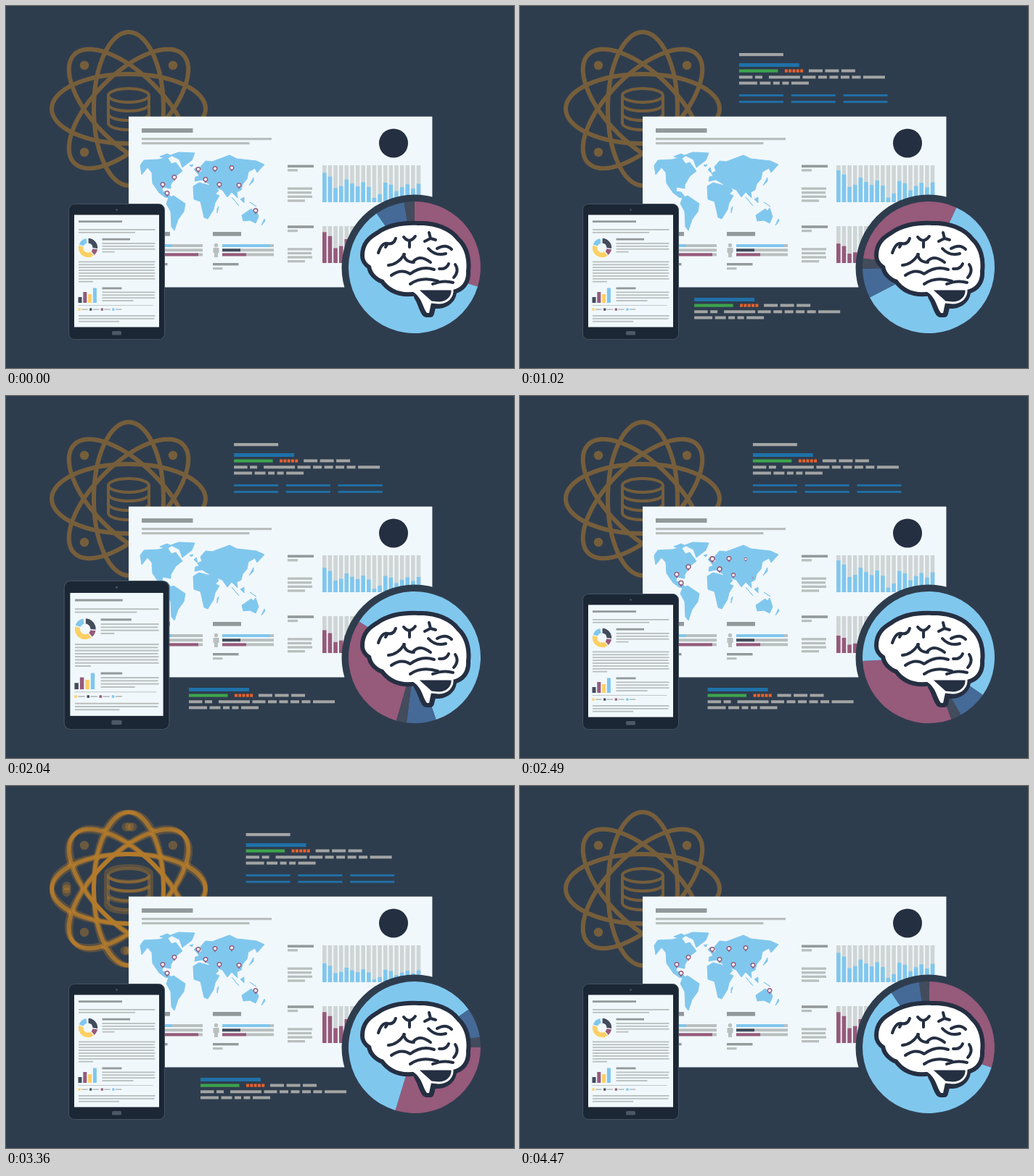
These frames come from a looping animation (700x500 px, 4500 ms). An HTML page:

```html
<!DOCTYPE html>
<html>
<head>
<meta charset="utf-8">
<style>
  html, body { margin: 0; height: 100%; overflow: hidden; background: #2e3d4e; }
  svg { display: block; width: 700px; height: 500px; }
</style>
</head>
<body>
<svg viewBox="0 0 700 500">
  <defs>
    <g id="orbits">
      <g fill="none" stroke-width="6">
        <ellipse id="orbit" rx="106" ry="48"/>
        <use href="#orbit" transform="rotate(45)"/>
        <use href="#orbit" transform="rotate(90)"/>
        <use href="#orbit" transform="rotate(135)"/>
      </g>
      <g stroke="none">
        <circle cx="-61" cy="-60" r="6.2"/><circle cx="61" cy="-60" r="6.2"/><circle cx="-61" cy="60" r="6.2"/>
      </g>
    </g>
    <g id="database" fill="none" stroke-width="4">
      <ellipse cy="-18.5" rx="28" ry="9.5"/>
      <path d="M-28-18V20C-26 32 26 32 28 20V-18M-28-6C-26 6 26 6 28-6M-28 7C-26 19 26 19 28 7"/>
    </g>
  </defs>

  <g transform="translate(169 142)" fill="#f59a1c" stroke="#f59a1c">
    <g id="atom"><use href="#orbits"/><use href="#database"/></g>
    <g id="echoes"></g>
  </g>
  <g id="codeTop"></g>
  <g id="codeBottom"></g>

  <rect x="169" y="152.7" width="418.400" height="235.800" fill="#f1f8fb"/>
  <g id="panel"></g>
  <g fill="#80c7ee" stroke="#80c7ee" stroke-linejoin="round">
    <path d="M185 220L190 213 210 212 222 209 228 218 234 216 243 228 234 235 227 247 227 252 216 250 215 256 222 257 229 266 219 264 211 258 202 245 201 230 195 223 187 233Z"/>
    <path d="M212 208L222 204 228 207 222 211ZM227 206L238 202 260 203 256 213 243 223 239 212Z"/>
    <path d="M224 265L231 262 247 273 245 284 237 295 232 310 228 305 227 284 221 273Z"/>
    <path d="M258 249L266 244 285 249 289 260 294 262 288 272 286 281 278 294 273 292 268 270 259 267ZM291 280L293 277 291 286Z"/>
    <path d="M260 242L261 236 266 235 264 231 270 228 268 222 275 214 284 215 308 206 318 211 345 214 356 219 346 230 343 224 334 229 332 239 326 246 324 254 318 257 319 265 311 257 305 264 298 254 290 251 293 255 287 261 280 246 270 240Z"/>
    <path d="M259 226L262 223 264 231ZM253 220L258 219 256 222ZM341 237L341 242 335 248ZM311 264L321 276ZM323 267L328 264 328 272ZM336 271L345 277Z"/>
    <path d="M325 289L338 280 341 283 344 279 348 291 344 300 336 296 327 297ZM356 294L357 297 352 303Z"/>
  </g>
  <g id="charts"></g>
  <g id="pins"></g>
  <g fill="#b9bfbe"><circle cx="289.500" cy="330.500" r="2.700"/><path d="M285.500 334H293.500V341H292V347H287V341H285.500Z"/></g>
  <circle cx="534" cy="189.500" r="20" fill="#252f42"/>

  <g id="tablet">
    <rect x="86.500" y="273.500" width="132" height="187" rx="8" fill="#1c2735" stroke="#465161"/>
    <rect x="94" y="288.500" width="117" height="155" fill="#f1f8fb"/>
    <circle cx="152.500" cy="281.500" r="1.300" fill="#4d5866"/>
    <rect x="146" y="449" width="13" height="5.500" rx="1.500" fill="#4d5866"/>
    <g id="page"></g>
    <g id="donut" transform="translate(113 334)" stroke="#f1f8fb" stroke-width="1.200"></g>
  </g>

  <circle cx="563" cy="361" r="100.500" fill="#2e3d4e"/>
  <g transform="translate(563 361)"><g id="pie"></g></g>

  <g stroke-linejoin="round" stroke-linecap="round">
    <g fill="#252f42" stroke="#252f42" stroke-width="12">
      <path id="lobe" d="M494 345C494 329 503 322 513 316C528 305 549 302 568 303C592 302 612 311 621 324C632 334 636 350 634 366C635 380 628 390 615 392L566 394C545 398 530 392 520 378C511 375 504 368 503 359C497 355 494 351 494 345Z"/>
      <path d="M566 392H615C616 402 608 411 596 412L587 412 584 424 579 424C574 418 574 410 568 401Z"/>
    </g>
    <use href="#lobe" fill="#fff"/>
    <path d="M566 391H615C616 402 608 410 596 410L586 409Z" fill="#252f42" stroke="#fff" stroke-width="3"/>
    <path d="M558 393C574 402 573 414 580 424L583 424 586 410 568 391Z" fill="#fff"/>
    <path d="M513 341Q518 326 526 328T537 321M526 328L523 333M548 319Q556 329 564 318M556 325V333M583 313L585 321 577 325M585 321L592 323M582 335Q592 346 606 342M594 335Q606 328 614 336M527 358Q540 357 549 343M548 343Q550 354 562 354M562 352Q571 343 585 354M531 372Q545 362 557 370 573 358 590 364M557 384Q573 373 595 380M597 363Q607 364 610 356M619 357Q625 366 617 375M588 384Q603 378 616 382" fill="none" stroke="#252f42" stroke-width="4"/>
  </g>
</svg>

<script>
const LOOP = 4500;
const DARK = '#939a9b', GREY = '#b9bfbe', TRACK = '#cfd5d5', CODE = '#a3a5a4';
const SKY = '#80c7ee', PLUM = '#965a7b', NAVY = '#434c5c', GOLD = '#fcd064', BLUE = '#1f71a8';
const el = id => document.getElementById(id);
const times = (n, make) => Array.from({ length: n }, (_, i) => make(i)).join('');
const rect = (x, y, w, h, fill) => `<rect x="${x}" y="${y}" width="${w}" height="${h}" fill="${fill}"/>`;
// Lines of greeked text; the last one is shorter.
const paragraph = (x, y, width, count, last, pitch, h) =>
  times(count, i => rect(x, y + i * pitch, i < count - 1 ? width - i % 2 : last, h, GREY));

// One row of code words, laid out from left to right.
function words(x, y, ...widths) {
  return widths.map(w => {
    const word = rect(x, y, w, 4, CODE);
    x += w + 3.5;
    return word;
  }).join('');
}

// Pie slices from [end angle, colour], each starting where the last one ends.
function slices(radius, parts) {
  const point = a => `${radius * Math.sin(a * Math.PI / 180)} ${-radius * Math.cos(a * Math.PI / 180)}`;
  let from = 0;
  return parts.map(([to, fill]) => {
    const path = `<path d="M0 0L${point(from)}A${radius} ${radius} 0 ${+(to - from > 180)} 1 ${point(to)}Z" fill="${fill}"/>`;
    from = to;
    return path;
  }).join('');
}

// Blocks of abstract code
const listing =
  rect(0, 79, 83, 5, BLUE) + rect(0, 87.5, 53.5, 4.2, '#3da44c') +
  times(5, i => rect(63 + i * 5.3, 87.5, 4, 4.2, '#e9622b')) + words(96, 87.5, 19, 19, 19) +
  words(0, 96.3, 18.5, 10) + words(41, 96.3, 43, 18, 12, 12, 12, 12, 30) + words(0, 104.5, 25, 15, 9, 9, 24);
el('codeTop').innerHTML = rect(0, 65, 61, 4.2, CODE) + listing +
  times(6, i => rect(i % 3 * 71.8, i < 3 ? 122 : 131, 61, 2.8, BLUE));
el('codeBottom').innerHTML = listing;

// Dashboard
const legend = y => rect(388, y, 36, 3.6, DARK) + rect(388, y + 5.7, 14, 3.3, GREY) + paragraph(388, y + 31, 34, 4, 24, 5.6, 3.3);
const meters = (x, ...values) =>
  rect(x, 312, 39, 5.7, DARK) + rect(x, 355, 35.5, 3.4, DARK) + rect(x, 361, 13.5, 3.2, GREY) +
  times(3, i => rect(x + 13, 329 + i * 6.2, 71, 4, GREY) + rect(x + 13, 329 + i * 6.2, values[i], 4, [SKY, NAVY, PLUM][i]));
el('panel').innerHTML =
  rect(187, 169, 70.5, 6, DARK) + paragraph(187, 182, 179, 2, 148.5, 6, 3.2) +
  legend(219.5) + legend(303.2) + meters(187, 29, 14, 65) + meters(285, 66, 25, 33);

function chart(id, base, fill) {
  const bar = (i, y, h, color) => rect(436 + i * 7.63, y, 5.6, h, color);
  const height = a => 24 + 6.5 * Math.cos(a - .44) + 5.8 * Math.cos(3 * a) + 7.5 * Math.cos(5 * a - .6);
  return times(18, i => bar(i, base - 51, 51, TRACK)) +
    `<g id="${id}">${times(18, i => bar(i, -height(i * Math.PI / 9), height(i * Math.PI / 9), fill))}</g>`;
}
el('charts').innerHTML = chart('skyBars', 271, SKY) + chart('plumBars', 355, PLUM);

const pins = [[216, 252], [222, 264], [232, 242], [265, 231], [275, 245], [288, 230], [294, 252], [311, 229], [321, 253], [344, 288]];
el('pins').innerHTML = times(pins.length, () =>
  `<g><path d="M0 0C-1-3-3.500-3-3.500-5.500A3.500 3.500 0 0 1 3.500-5.500C3.500-3 1-3 0 0Z" fill="${PLUM}"/><circle cy="-5.500" r="2" fill="#fff"/></g>`);
const pinNodes = [...el('pins').children];

// Tablet page
const text = (...box) => paragraph(...box, 3.9, 1.8);
const palette = [GOLD, NAVY, PLUM, SKY];
el('page').innerHTML =
  rect(100, 296.3, 60, 2.8, DARK) + rect(132.5, 320.8, 38.5, 2.8, DARK) + rect(132.5, 388.5, 27, 2.8, DARK) +
  text(100, 308, 105.5, 2, 78) + text(132.5, 327, 73, 4, 17) + text(100, 352.5, 105.5, 8, 20) +
  text(132.5, 394.5, 73, 4, 43) + text(100, 427, 105.5, 3, 56) + rect(99.5, 413, 103, .8, GREY) +
  [8, 15, 12, 20.5].map((h, i) => rect(99.5 + i * 6.8, 410 - h, 5, h, [NAVY, PLUM, GOLD, SKY][i])).join('') +
  times(4, i => rect(99.5 + i * 15.6, 417.5, 3.2, 3.2, palette[i]) + rect(104 + i * 15.6, 418.3, 8.5, 1.6, GREY));
el('donut').innerHTML =
  slices(13.8, [[97, NAVY], [142, PLUM], [288, GOLD], [352, SKY]]) + '<circle r="6" fill="#f1f8fb"/>';
el('pie').innerHTML = slices(91, [[107, PLUM], [325, SKY], [351, '#456a97'], [360, NAVY]]);

// Motion
const progress = (t, start, length) => Math.min(1, Math.max(0, (t - start) / length));
const backIn = (p, s) => p * p * ((s + 1) * p - s);
// Value at time t, eased between [time, value] keys.
function track(t, ...keys) {
  let i = 1;
  while (i < keys.length - 1 && t > keys[i][0]) i++;
  const [t0, a] = keys[i - 1], [t1, b] = keys[i];
  return a + (b - a) * (1 - Math.cos(Math.PI * progress(t, t0, t1 - t0))) / 2;
}
const move = (node, transform) => node.setAttribute('transform', transform);
const fade = (node, opacity) => node.setAttribute('opacity', opacity);

// Fast spin with a short trail of fainter copies
el('echoes').innerHTML = times(3, () => '<use href="#orbits"/>') + '<use href="#database" transform="scale(1.13)"/>';
const echoes = [...el('echoes').children];
function spin(t) {
  const glow = track(t, [2500, 0], [2850, 1], [3400, 1], [3830, 0]);
  fade(el('atom'), .36 - .06 * glow);
  echoes.forEach((echo, i) => {
    const left = 1 - progress(t + 15 - i * 15, 2500, 1330);
    fade(echo, .22 * glow);
    if (i < 3) move(echo, `rotate(${-360 * left * left})`);
  });
}

function draw(t) {
  const hidden = (inAt, inFor, outAt, outFor) =>
    backIn(1 - progress(t, inAt, inFor), 2.45) + backIn(progress(t, outAt, outFor), 2.35);
  const drift = track(t, [500, 0], [3850, 32.3]);
  move(el('codeTop'), `translate(${300 + drift} ${100 * hidden(250, 700, 3630, 727)})`);
  move(el('codeBottom'), `translate(${238.3 + drift * .97} ${324 - 50 * hidden(350, 500, 3915, 400)})`);

  move(el('pie'), `rotate(${-360 * progress(t, 0, 4480)})`);

  const sky = track(t, [0, .97], [1050, 1.05], [1700, .62], [2450, 1.05], [3300, .62], [3700, .62], [LOOP, .97]);
  const plum = .79 + .23 * Math.cos(Math.PI * Math.min(t, 3200) / 800);
  move(el('skyBars'), `translate(0 271) scale(1 ${sky})`);
  move(el('plumBars'), `translate(0 355) scale(1 ${plum})`);

  pinNodes.forEach((pin, i) => {
    const gone = t < 2000 ? progress(t, 80 + i * 50, 500) : 1 - progress(t, 2050 + i * 50, 500);
    move(pin, `translate(${pins[i]}) scale(${Math.max(0, 1 - backIn(gone, 1.7))})`);
  });

  const zoom = track(t, [1390, 1], [1870, 1.255], [2165, 1]);
  move(el('tablet'), `translate(152.5 461) scale(${zoom}) translate(-152.5 -461)`);
  spin(t);
}

function frame() {
  draw(performance.now() % LOOP);
  requestAnimationFrame(frame);
}
frame();
</script>
</body>
</html>
```
